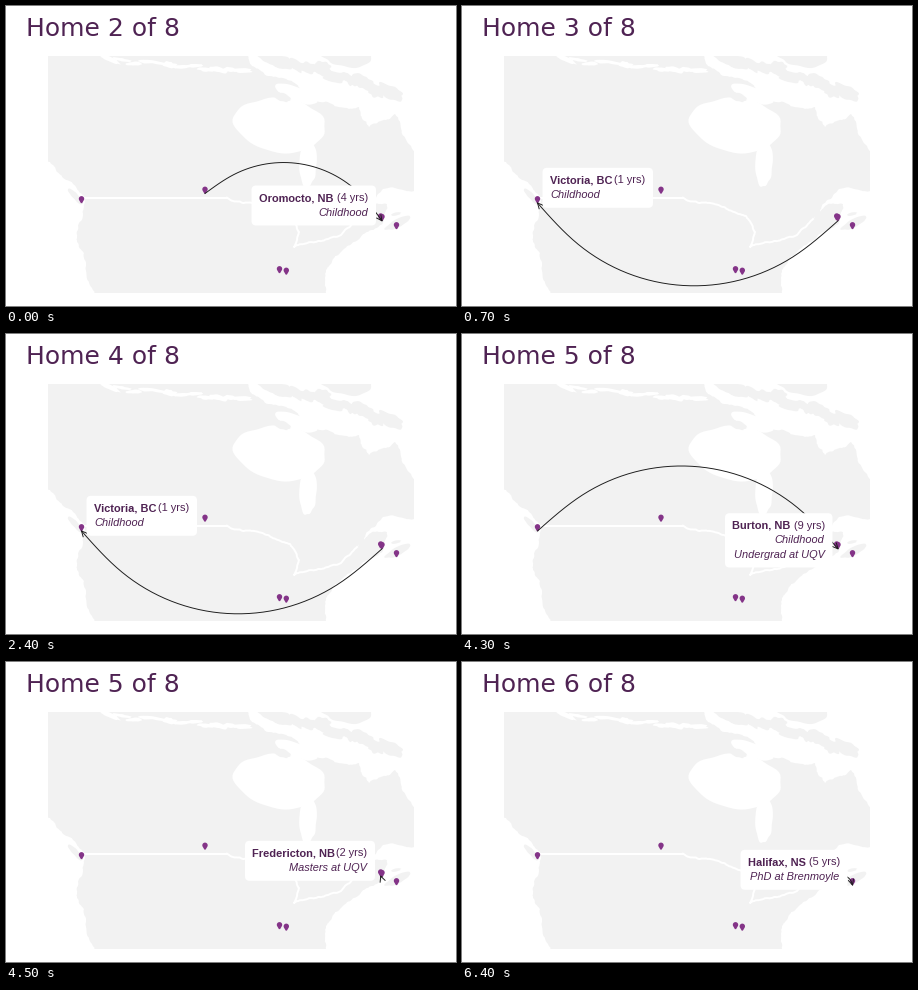
Animation, 450 px wide and 300 px high, one loop 8000 ms. Source, as a matplotlib script:

```python
import numpy as np
import matplotlib.pyplot as plt
from matplotlib.animation import FuncAnimation
from matplotlib.patches import FancyBboxPatch, Polygon, Rectangle

W, H, DPI = 450, 300, 100
STEP, LOOP, STAY = 100, 8000, 1900
PX = 72 / DPI
LAND, INK, PIN, LINE = "#f2f2f2", "#4f2353", "#843488", "#1c1c1c"
WHITE = "white"

fig = plt.figure(figsize=(W / DPI, H / DPI), dpi=DPI, facecolor=WHITE)
ax = fig.add_axes([0, 0, 1, 1])
ax.set(xlim=(0, W), ylim=(H, 0))
ax.axis("off")
frame = Rectangle((42, 49.5), 366, 237, transform=ax.transData)
rng = np.random.default_rng(7)


# --- map ---------------------------------------------------------------

def rough(points, amount, levels=4):
    """Add coast-like detail by midpoint displacement."""
    z = np.array([complex(*p) for p in points])
    for _ in range(levels):
        d = np.diff(z)
        size = np.abs(d)
        shift = rng.uniform(-amount, amount, len(d)) * np.minimum(size, 20)
        out = np.empty(2 * len(z) - 1, complex)
        out[::2], out[1::2] = z, (z[:-1] + z[1:]) / 2 + 1j * d / size * shift
        z = out
    return z


def fill(z, color):
    patch = Polygon(np.column_stack([z.real, z.imag]), fc=color, ec="none", zorder=1)
    ax.add_patch(patch)
    patch.set_clip_path(frame)


def blob(x, y, rx, ry, color, tilt=0, wobble=0.2):
    """Ellipse with a randomly waved outline."""
    a = np.linspace(0, 2 * np.pi, 70)
    r = 1 + sum(wobble / n**0.7 * rng.uniform(-1, 1) * np.cos(n * a + rng.uniform(0, 6))
                for n in range(2, 11)) / 1.5
    z = r * (rx * np.cos(a) + 1j * ry * np.sin(a))
    fill(complex(x, y) + z * np.exp(1j * np.radians(tilt)), color)


def border(points, amount):
    z = rough(points, amount)
    ax.plot(z.real, z.imag, color=WHITE, lw=2 * PX, zorder=1)


west = [(30, 40), (30, 140), (44, 156), (60, 174), (78, 190), (75, 215), (71, 236),
        (80, 260), (90, 295)]
east = [(318, 295), (320, 264), (334, 247), (352, 234), (377, 217), (381, 198),
        (366, 198), (351, 213), (361, 198), (377, 183), (415, 183), (405, 140),
        (389, 108), (380, 114), (363, 121), (353, 101), (326, 98)]
north = [(300, 94), (290, 78), (262, 70), (246, 60), (238, 40), (30, 40)]
fill(rough(west + east + north, 0.13), LAND)

# Hudson Bay, James Bay and Foxe Basin
blob(274, 119, 46, 27, WHITE, 8, 0.14)
blob(302, 157, 9, 23, WHITE, 0, 0.15)
blob(290, 88, 22, 7, WHITE, 20)
blob(276, 91, 9, 4, LAND, 20)

# broken arctic channels, then the northern islands
for x in np.linspace(104, 236, 12):
    y = 54 + 0.09 * (x - 104) + rng.uniform(-2, 2)
    blob(x, y, rng.uniform(7, 12), rng.uniform(1.5, 3.2), WHITE, rng.uniform(-5, 25), 0.35)
for s in np.linspace(0, 1, 10):
    blob(262 + 122 * s, 54 + 34 * s**1.4 + rng.uniform(-3, 3), rng.uniform(9, 15),
         rng.uniform(4, 7), LAND, rng.uniform(5, 40), 0.35)
blob(340, 49, 25, 12, LAND, 8)

# coastal islands
blob(70, 190, 12, 4.5, WHITE, 48)
blob(69.5, 190.5, 10, 3, LAND, 48)
blob(392, 217, 14, 4, LAND, -25)
blob(390, 208, 5, 1.5, LAND, -10)

border([(78, 191.7), (221, 191.7)], 0)
border([(221, 191.7), (238, 197), (262, 201), (284, 210), (293, 226), (288, 241),
        (312, 235), (335, 229), (351, 213)], 0.09)


# --- pins, arrows and labels ---------------------------------------------

def add_pin(x, y, r=2.7):
    a = np.radians(np.linspace(150, 390, 30))
    pts = np.column_stack([x + r * np.cos(a), y + r * np.sin(a)])
    pts = np.vstack([pts, [x + 0.6, y + 1.6 * r], [x - 0.6, y + 1.6 * r]])
    ax.add_patch(Polygon(pts, fc=PIN, ec="none", zorder=3))


WEST, CENTRE, EAST = (75.5, 192.8), (199, 183.3), (390.5, 218.8)
CAPITAL, BASE = (374.7, 210), (376, 210.6)
for spot in [WEST, CENTRE, EAST, CAPITAL, BASE, (273.5, 262.8), (280.3, 264.3)]:
    add_pin(*spot)


def bend(start, end, curvature=0.51, knots=7):
    """B-spline over points of a circular arc, bulging left of travel."""
    half = 2 * np.arctan(curvature)
    a = np.linspace(-half, half, knots)
    arc = 0.5 + 0.5 * (np.sin(a) - 1j * (np.cos(a) - np.cos(half))) / np.sin(half)
    p = np.concatenate([[2 * arc[0] - arc[1]], arc, [2 * arc[-1] - arc[-2]]])
    t = np.linspace(0, 1, 9)
    basis = [(1 - t)**3, 3 * t**3 - 6 * t**2 + 4,
             -3 * t**3 + 3 * t**2 + 3 * t + 1, t**3]
    z = np.concatenate([sum(b * q for b, q in zip(basis, p[k:k + 4])) / 6
                        for k in range(knots - 1)])
    return start + (end - start) * z


def add_arrow(start, end, head=6, spread=26):
    drop = 4.2j  # from pin centre to pin tip
    z = bend(complex(*start) + drop, complex(*end) + drop)
    back = z[-4] - z[-1]
    turn = np.exp(1j * np.radians(spread))
    barb = head * back / abs(back)
    tip = np.array([z[-1] + barb * turn, z[-1], z[-1] + barb / turn])
    return [ax.plot(q.real, q.imag, color=LINE, lw=0.95 * PX, zorder=4)[0]
            for q in (z, tip)]


def add_text(x, y, s, size=11, **kw):
    kw = {"family": "Liberation Sans", **kw}
    return ax.text(x, y, s, size=size * PX, color=INK, va="baseline", zorder=6, **kw)


def add_label(left, right, top, place, years, notes, align="right"):
    box = FancyBboxPatch((left, top), right - left, 25.7 + 14.3 * len(notes),
                         boxstyle="round,pad=0,rounding_size=4.5",
                         fc=WHITE, ec="none", zorder=5)
    edge = right - 8 if align == "right" else left + 8
    return [ax.add_patch(box),
            add_text(left + 7.5, top + 15.6, place, weight="bold"),
            add_text(right - 7.7, top + 15.6, f"({years} yrs)", ha="right"),
            *(add_text(edge, top + 30 + 14.4 * i, note, style="italic", ha=align)
              for i, note in enumerate(notes))]


moves = [
    (CENTRE, BASE, (245.5, 370, 179.5, "Oromocto, NB", 4, ["Childhood"])),
    (BASE, WEST, (80.5, 191, 161.8, "Victoria, BC", 1, ["Childhood"], "left")),
    (WEST, BASE, (263, 370.5, 179.2, "Burton, NB", 9,
                  ["Childhood", "Undergrad at UQV"])),
    (BASE, CAPITAL, (239, 369, 178.8, "Fredericton, NB", 2, ["Masters at UQV"])),
    (CAPITAL, EAST, (278.5, 385.5, 187.8, "Halifax, NS", 5, ["PhD at Brenmoyle"])),
]
scenes = [add_arrow(a, b) + add_label(*label) for a, b, label in moves]
title = add_text(20.4, 30, "", size=25, family="DejaVu Sans")


def update(i):
    # the heading changes 200 ms before the map
    t = i * STEP
    title.set_text(f"Home {2 + (t + STAY - 500) // STAY} of 8")
    current = (t + STAY - 700) // STAY
    for k, parts in enumerate(scenes):
        for part in parts:
            part.set_visible(k == current)
    return [title]


anim = FuncAnimation(fig, update, frames=LOOP // STEP, interval=STEP,
                     repeat=True, repeat_delay=0, blit=False)
plt.show()
```
